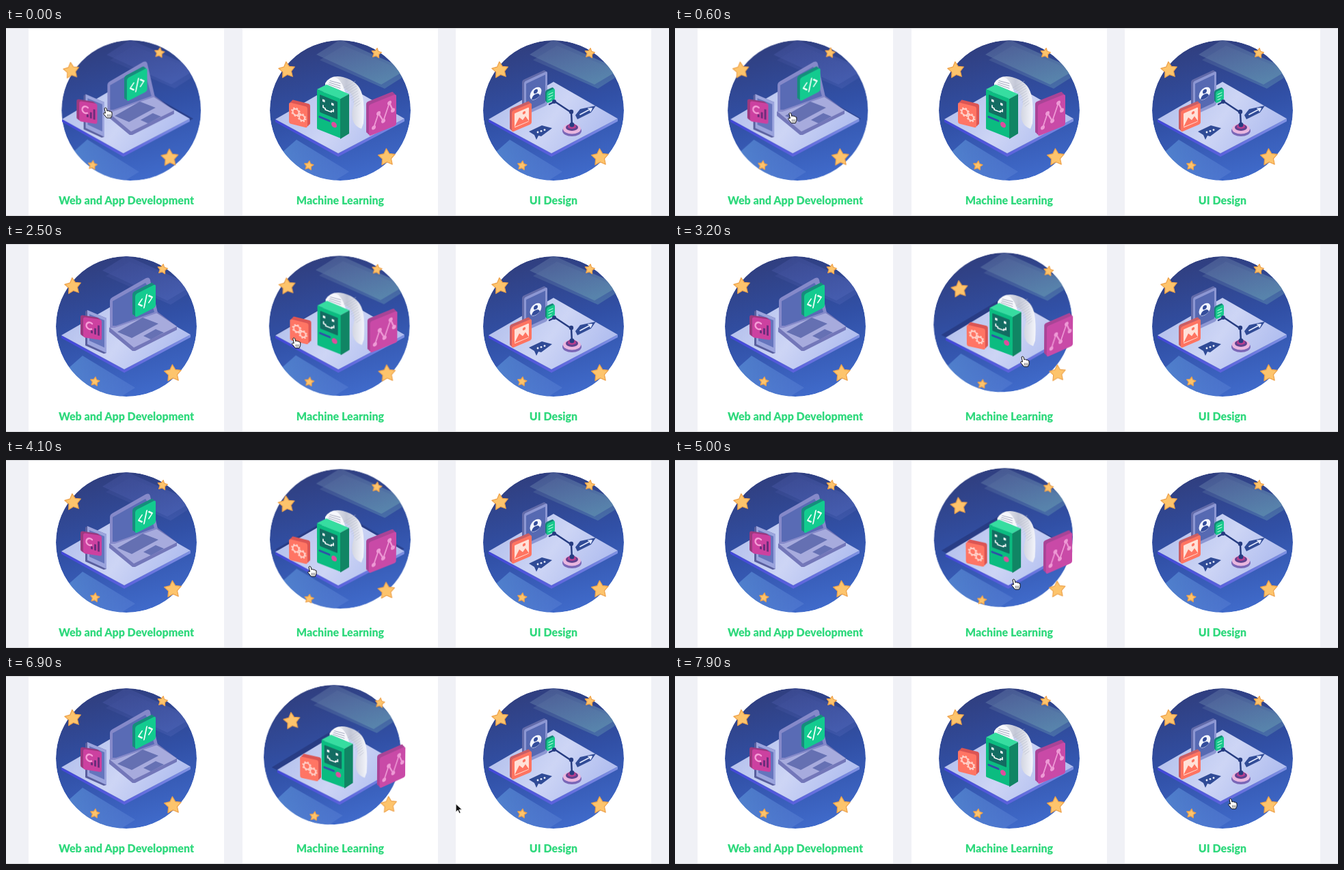
These frames come from a looping animation (970x276 px, 8 s). An HTML page:

```html
<!DOCTYPE html>
<html lang="en">
<head>
<meta charset="utf-8">
<title>Course cards</title>
<style>
html, body { margin: 0; width: 100%; height: 100%; overflow: hidden; background: #f0f1f6; }
#stage { position: relative; width: 970px; height: 276px; overflow: hidden; }
#stage::after { content: ""; position: absolute; inset: 0; border: solid #d6d7da; border-width: 1px 0; }
.card { position: absolute; top: 0; width: 286px; height: 276px; background: #fff; }
.title { position: absolute; top: 242px; width: 100%; text-align: center; white-space: nowrap;
  font: 900 16px/22px "Baloo 2", Lato, sans-serif; color: #30d97d; }
.scene { position: absolute; left: 143px; top: 121px; width: 0; height: 0; transform-style: preserve-3d; }
svg { position: absolute; left: 0; top: 0; overflow: visible; transform-origin: 0 0; }
#pointer { z-index: 2; }
</style>
</head>
<body>
<div id="stage"></div>
<svg width="0" height="0">
  <defs>
    <linearGradient id="sky" x1=".35" y1="0" x2=".6" y2="1">
      <stop stop-color="#303e7e"/><stop offset=".5" stop-color="#3150a6"/><stop offset="1" stop-color="#406bcb"/>
    </linearGradient>
    <linearGradient id="floor" x1="0" y1=".3" x2="1" y2=".7">
      <stop stop-color="#b2bfec"/><stop offset=".5" stop-color="#cdd5f5"/><stop offset="1" stop-color="#abb9ee"/>
    </linearGradient>
    <linearGradient id="edge"><stop stop-color="#4146d8"/><stop offset=".5" stop-color="#5b62dc"/><stop offset="1" stop-color="#7e91e2"/></linearGradient>
    <linearGradient id="paper"><stop stop-color="#fff"/><stop offset=".55" stop-color="#c3c7d6"/><stop offset="1" stop-color="#f4f5fb"/></linearGradient>
    <linearGradient id="teal" x1="0" y1="0" x2=".6" y2="1"><stop stop-color="#5a6a9e" stop-opacity=".5"/><stop offset="1" stop-color="#5b88ad" stop-opacity=".85"/></linearGradient>
    <linearGradient id="blue" x1="0" y1="0" x2=".6" y2="1"><stop stop-color="#3f4c94" stop-opacity=".6"/><stop offset="1" stop-color="#465daf" stop-opacity=".85"/></linearGradient>
    <linearGradient id="low"><stop stop-color="#5b92d8" stop-opacity=".7"/><stop offset="1" stop-color="#5a80d4" stop-opacity=".45"/></linearGradient>
    <clipPath id="disc"><circle r="103"/></clipPath>
  </defs>
</svg>
<script>
const LOOP = 8000, DEPTH = 1000;
const stage = document.getElementById('stage');

const poly = (points, fill, more = '') => `<polygon points="${points}" fill="${fill}" ${more}/>`;
const rect = (x, y, w, h, fill, r = 0) => `<rect x="${x}" y="${y}" width="${w}" height="${h}" rx="${r}" fill="${fill}"/>`;
const line = (d, color, width = 1.5) =>
  `<path d="${d}" fill="none" stroke="${color}" stroke-width="${width}" stroke-linecap="round" stroke-linejoin="round"/>`;
const dot = (x, y, r, fill) => `<circle cx="${x}" cy="${y}" r="${r}" fill="${fill}"/>`;
const skewed = (x, y, angle, art) => `<g transform="translate(${x} ${y}) skewY(${angle})">${art}</g>`;

// A thick rounded tile standing on the floor; art is in tile coordinates.
const tile = (x, y, w, h, angle, front, back, dx, dy, art) =>
  skewed(x + dx, y + dy, angle, rect(0, 0, w, h, back, 3)) +
  skewed(x + dx / 2, y + dy / 2, angle, rect(0, 0, w, h, back, 3)) +
  skewed(x, y, angle, rect(0, 0, w, h, front, 3) + art);

function star(x, y, r, turn) {
  const points = Array.from({ length: 10 }, (_, i) => {
    const a = turn + i * Math.PI / 5 - Math.PI / 2, d = i % 2 ? r * .52 : r;
    return `${(x + d * Math.cos(a)).toFixed(1)},${(y + d * Math.sin(a)).toFixed(1)}`;
  }).join(' ');
  return poly(points, '#fdc46c', 'stroke="#eea24b" stroke-width="1.2" stroke-linejoin="round"');
}

function gear(x, y, r) {
  return `<circle cx="${x}" cy="${y}" r="${r}" fill="none" stroke="#ffd3cb" stroke-width="2"/>` +
    `<circle cx="${x}" cy="${y}" r="${r + 1.6}" fill="none" stroke="#ffd3cb" stroke-width="1.6" stroke-dasharray="${(r + 1.6) * Math.PI / 8}"/>`;
}

const backdrop = panel => `<g clip-path="url(#disc)"><circle r="103" fill="url(#sky)"/>` +
  poly('-27,-72 8,-93 104,-53 68,-30', `url(#${panel})`, 'transform="translate(-3 -2)" opacity=".6"') +
  poly('-35,-82 0,-104 97,-60 60,-38', `url(#${panel})`) +
  poly('-90,66 -64,43 13,90 -22,112', 'url(#low)') + '</g>';
const DIAMOND = '-95,13 0,-42 94,12 -3,63';
const ground = poly('-95,13 -3,63 94,12 94,16 -3,68 -95,17', 'url(#edge)') + poly(DIAMOND, 'url(#floor)');
const stars = star(-78, -59, 12.5, -.1) + star(53, -84, 7.5, .15) + star(68, 69, 13, -.05) + star(-46, 81, 7, .15);

const laptop =
  poly('-25,2 37,-28 74,0 74,5 13,36 9,36 -25,8', '#7377b9') +
  poly('-25,1 -20,-1 44,-20 74,0 11,31', '#a7abdd') +
  '<path d="M-24,2V-37Q-24,-41 -20,-43L29,-71Q34,-73 35,-68L46,-20L-17,2Z" fill="#8589c9"/>' +
  poly('-20,-1 -20,-37 28,-64 30,-61 41,-21 -15,-1', '#596bb5') +
  poly('-13,8 24,-13 47,-4 8,17', '#6570b2') +
  poly('25,14 43,4 55,9 36,19', '#6671b4');

const phone = poly('-60,-22 -57,-24 -29,-12 -29,39 -33,40 -60,28', '#595f9e') +
  poly('-57,-24 -29,-12 -29,39 -57,26', '#9ba4dd') + poly('-54,-18 -32,-9 -32,31 -54,21', '#6575bd');

const chart = tile(-63, -14, 27, 30, 9, '#cc41a0', '#9c397f', -4, -3,
  line('M13 8a5 5 0 1 0 -1 8', '#f59dd7', 2.5) + rect(11, 18, 3, 4, '#6d2d7c') + rect(16, 14, 3, 9, '#6d2d7c') + rect(21, 9, 3, 15, '#6d2d7c'));

const code = tile(13, -47, 30, 34, -27, '#13cb8f', '#168d7c', -4, -3,
  line('M10 12L5 17L10 22M20 12L25 17L20 22M17 9L13 26', '#effff8', 2));

const scroll = '<path d="M-22,-33V-40Q-14,-53 4,-49Q27,-43 32,-24Q36,-8 34,19L31,27Q23,24 20,18Q15,9 19,-5Q24,-22 8,-31L-2,-36Z" fill="url(#paper)"/>' +
  '<path d="M-23,-33Q-18,-48 -9,-49Q2,-47 8,-24L-1,-21Z" fill="#f6f7fc"/>' +
  Array.from({ length: 6 }, (_, i) => line(`M${-20 + i},${-31 - i * 2.5}l${20 - i},${9 - i}`, '#8d94ad', .8)).join('') +
  Array.from({ length: 10 }, (_, i) => line(`M${5 + i * 2},${-33 + i * 3}l${17 - i * 1.2},${-10 + i * .6}`, '#b5bac9', .6)).join('');

const robot = poly('-34,-31 -20,-38 13,-24 0,-17', '#36dda0') +
  poly('0,-17 13,-24 13,34 0,42', '#108564') +
  skewed(-34, -31, 22, rect(0, 0, 34, 58, '#0bbc80', 1) + rect(4, 6, 26, 26, '#136c62', 1) +
    rect(8, 11, 3.5, 3.5, '#fff') + rect(21, 11, 3.5, 3.5, '#fff') +
    line('M9 20v3h3v2h9v-2h3v-3', '#fff', 1.7) + line('M4 39h14', '#314ca9', 3) + dot(25, 42, 4, '#dd4e9d'));

const gears = tile(-75, -12, 27, 31, 14, '#ff7564', '#db5554', 4, -4, gear(10, 12, 4.5) + gear(19, 18, 4));
const graph = tile(42, -8, 40, 46, -22, '#c94aa7', '#a94496', -4, -4,
  line('M7 36L14 18L21 32L30 9L35 22', '#ee9bd6', 2) +
  [[7, 36], [14, 18], [21, 32], [30, 9], [35, 22]].map(([x, y]) => dot(x, y, 3, '#ee9bd6')).join(''));

const profile = tile(-43, -42, 34, 50, -25, '#8d97d3', '#626ba9', -3, -2,
  rect(3, 4, 28, 41, '#5669b2', 1) + dot(17, 25, 8.5, '#f1f4ff') + dot(17, 22, 3, '#344d9b') + '<path d="M11 31q1-5 6-5t6 5q-6 4-12 0" fill="#344d9b"/>');
const picture = tile(-61, 1, 29, 31, -23, '#ff7461', '#c95e65', -3, -3,
  rect(4, 5, 21, 21, '#ffe1d8', 1) + poly('4,25 11,14 16,20 20,16 25,25', '#ff7461') + dot(18, 10, 2.2, '#ff7461'));
const lamp = tile(-10, -27, 12, 17, -25, '#18c98c', '#138576', -2, -2,
  line('M3 5h6M3 9h6M3 13h4', '#c9ffe9', 1)) +
  '<ellipse cx="27" cy="30" rx="14" ry="8" fill="#7a67b7"/><ellipse cx="27" cy="27" rx="13" ry="7.5" fill="#e9b6df"/>' +
  '<ellipse cx="27" cy="25" rx="9" ry="5" fill="#60418f"/><path d="M21 25q0-6 6-6t6 6q-6 4-12 0" fill="#b83f8f"/>' +
  line('M27 22L26 3L2 -13L-6 -9', '#263c81', 2.5) + dot(26, 2, 3.2, '#263c81') + dot(27, 21, 3.5, '#263c81') + dot(1, -13, 3, '#263c81');
const signs = poly('32,7 39,-2 62,-7 55,3 35,13', '#304b96') + line('M39 6L56 -3M51 -3L56 -3L54 1', '#e3e9ff', 1.7) +
  poly('-36,31 -17,22 -2,26 -18,38 -22,37 -25,43 -28,36', '#304b96') +
  [0, 1, 2].map(i => dot(-23 + i * 5, 32 - i * 1.7, 1.4, '#f1f4ff')).join('');

// Each layer is [distance from the card plane, art].
const wrap = (panel, layers) => [[-40, backdrop(panel)], [-25, poly(DIAMOND, '#202e70', 'opacity=".55"')],
  [9, ground], ...layers, [28, stars]];
const cards = [
  { x: 33, title: 'Web and App Development', layers: wrap('blue', [[24, phone], [26, laptop], [46, chart], [74, code]]) },
  { x: 346, title: 'Machine Learning', layers: wrap('teal', [[25, scroll + robot], [60, gears], [70, graph]]) },
  { x: 658, title: 'UI Design', layers: wrap('teal', [[20, profile], [26, signs], [30, lamp], [45, picture]]) }
];

// Tilt keys: [time, left-right degrees, up-down degrees]
const tilts = [
  [[0, -8.6, 0], [400, -8, 0], [1300, 20, -1], [1550, 20, -1], [2200, 0, 0]],
  [[2300, 0, 0], [3200, 11, 7], [4100, 0, 6], [5000, 10, 8.5], [6400, 17, 11], [6700, 17, 8], [7400, 0, 0]],
  [[0, 0, 0]]
];
// Pointer tip keys: [time, x, y]
const path = [[0, 142, 116], [400, 147, 124], [1500, 350, 119], [2100, 380, 125], [3200, 505, 164], [4100, 441, 155],
  [5000, 492, 174], [6400, 567, 187], [7200, 700, 188], [7900, 809, 179]];

const hand = '<path d="M2 2Q3.5 0 5 2L6 6L7.5 5.3L9 6.2L10.5 6L11.5 7.2L13 7.5L13 12L11.5 16H5.5L1 10.5Q0 8 3.5 9Z" fill="#fff" stroke="#111" stroke-width="1" stroke-linejoin="round"/>' +
  line('M6.5 11v3M8.5 11v3M10.5 11v3', '#333', .7);
const arrow = '<path d="M0 0V12L3 9.3L5 14L7 13L5 8.5H9Z" fill="#111" stroke="#fff" stroke-width=".8"/>';

const scenes = cards.map(({ x, title, layers }) => {
  const card = document.createElement('div');
  card.className = 'card';
  card.style.left = x + 'px';
  card.innerHTML = `<div class="scene">${layers.map(([z, art]) =>
    `<svg width="1" height="1" style="transform:translateZ(${z}px) scale(${1 - z / DEPTH})">${art}</svg>`).join('')}</div>` +
    `<div class="title">${title}</div>`;
  stage.append(card);
  return card.firstChild;
});
stage.insertAdjacentHTML('beforeend', `<svg id="pointer" width="16" height="18"><g>${hand}</g><g>${arrow}</g></svg>`);
const pointer = document.getElementById('pointer');
const [handIcon, arrowIcon] = pointer.children;

function sample(keys, t) {
  const next = keys.findIndex(key => key[0] > t);
  if (next < 1) return keys[next < 0 ? keys.length - 1 : 0].slice(1);
  const a = keys[next - 1], b = keys[next], k = (t - a[0]) / (b[0] - a[0]), ease = k * k * (3 - 2 * k);
  return [1, 2].map(i => a[i] + (b[i] - a[i]) * ease);
}

function draw() {
  const t = performance.now() % LOOP;
  scenes.forEach((scene, i) => {
    const [ry, rx] = sample(tilts[i], t);
    scene.style.transform = `perspective(${DEPTH}px) rotateX(${-rx}deg) rotateY(${ry}deg)`;
  });
  const [x, y] = sample(path, t);
  const over = cards.some(card => Math.abs(x - card.x - 143) < 103);
  pointer.style.transform = `translate(${x}px, ${y}px)`;
  handIcon.style.display = over ? '' : 'none';
  arrowIcon.style.display = over ? 'none' : '';
  requestAnimationFrame(draw);
}
draw();
</script>
</body>
</html>
```
